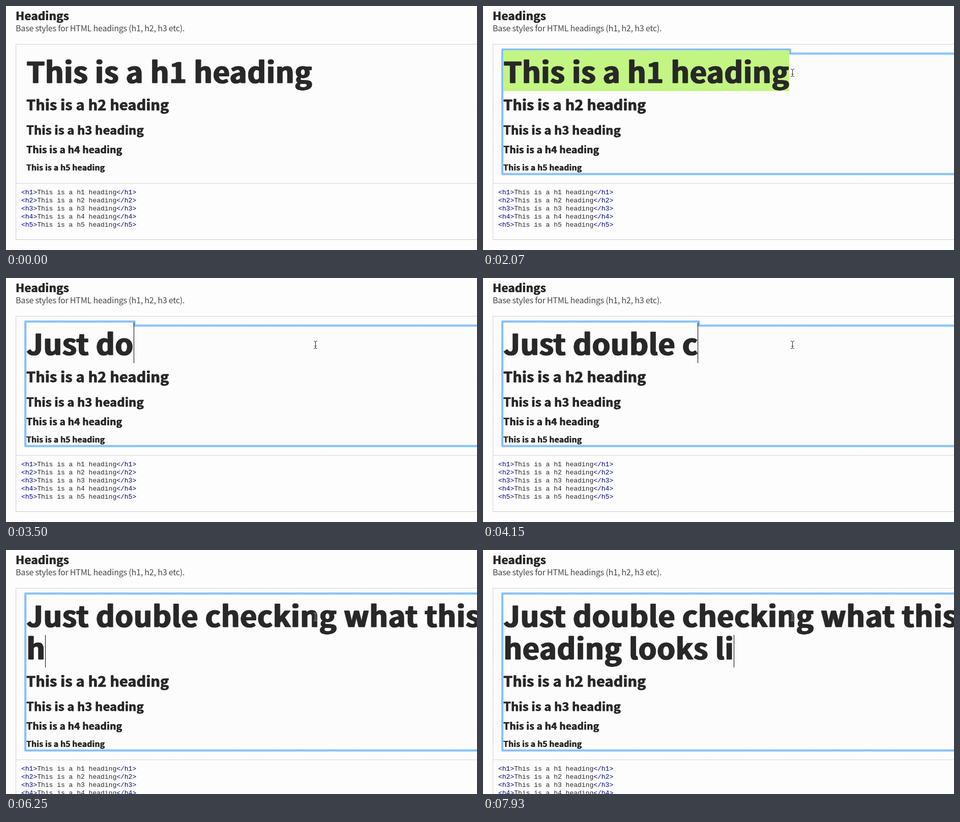
Write an HTML page with a canvas that moves like this. It is 926 px wide and 482 px high and loops after 7990 ms.

```html
<!DOCTYPE html>
<html lang="en">
<head>
<meta charset="utf-8">
<title>Editable headings</title>
<style>
html, body { margin: 0; width: 100%; height: 100%; overflow: hidden; background: #fdfdfd; }
canvas { display: block; }
</style>
</head>
<body>
<canvas id="stage" width="926" height="482"></canvas>
<script>
const ctx = document.getElementById('stage').getContext('2d');
const LOOP = 7990, INK = '#282828', NAVY = '#000080', H1 = 57.3;
const SANS = '"Noto Sans CJK JP", "Noto Sans CJK SC", "Noto Sans CJK", "Open Sans", sans-serif';
const MONO = '13px "Liberation Mono", "Courier New", monospace';

// bursts of typing: text, first and last key time
const BURSTS = [
  ['J', 2880, 2880], ['ust ', 3030, 3200], ['d', 3350, 3350], ['oub', 3500, 3700],
  ['le ', 3880, 4000], ['check', 4150, 4530], ['ing ', 4710, 4980], ['what this', 5160, 5740],
  ['\nheading l', 6250, 6950], ['ooks ', 7100, 7450], ['li', 7810, 7930]
];
const SUBHEADS = [['h2', 28.6, 206], ['h3', 23.54, 254], ['h4', 19.2, 291], ['h5', 15.73, 325]];

const dots = document.createElement('canvas');
dots.width = dots.height = 4;
const dot = dots.getContext('2d');
dot.fillStyle = '#f0f0f0';
dot.fillRect(0, 0, 1, 1);
const pattern = ctx.createPattern(dots, 'repeat');

function rect(x, y, w, h, color) {
  ctx.fillStyle = color;
  ctx.fillRect(x, y, w, h);
}

function strokes(...layers) {
  for (const [w, color] of layers) {
    ctx.lineWidth = w;
    ctx.strokeStyle = color;
    ctx.stroke();
  }
}

function text(str, x, y, font, color = INK, spacing = 0) {
  ctx.font = font;
  ctx.letterSpacing = spacing + 'px';
  ctx.fillStyle = color;
  ctx.fillText(str, x, y);
}

function heavyFont(size) {
  ctx.font = `900 ${size}px ${SANS}`;
  ctx.letterSpacing = size * .0115 + 'px';
}

// bold thickened to a black weight, mostly sideways
function heavy(str, x, y, size) {
  heavyFont(size);
  ctx.fillStyle = ctx.strokeStyle = INK;
  ctx.lineWidth = size * .011;
  ctx.lineJoin = 'round';
  for (const side of [-1, 1]) {
    const sx = x + size * (.006 + side * .016);
    ctx.fillText(str, sx, y);
    ctx.strokeText(str, sx, y);
  }
}

function width(str) {
  heavyFont(H1);
  return ctx.measureText(str).width;
}

function typed(t) {
  let out = '';
  for (const [str, start, end] of BURSTS) {
    if (t < start) break;
    const wrap = str[0] === '\n' ? 1 : 0, keys = str.length - wrap;
    const gap = keys > 1 ? (end - start) / (keys - 1) : 1;
    out += str.slice(0, wrap + Math.min(keys, Math.floor((t - start) / gap + 1e-6) + 1));
  }
  return out;
}

function ring(right, bottom) {
  ctx.beginPath();
  ctx.moveTo(38, 86);
  ctx.lineTo(right, 86);
  ctx.lineTo(right, 94);
  ctx.lineTo(960, 94);
  ctx.lineTo(960, bottom);
  ctx.lineTo(38, bottom);
  ctx.closePath();
  ctx.lineJoin = 'round';
  strokes([5.4, 'rgba(130,190,250,.35)'], [3.2, '#80bbf8']);
}

function pointer(t) {
  if (t < 830) return;
  let x = 886, y = 281;
  if (t >= 950) {
    const step = t < 1120 ? 0 : Math.min(4, Math.floor((t - 1120) / 40) + 1);
    x = Math.round(673 - 65 * step / 4);
    y = Math.round(158 - 26 * step / 4);
  }
  ctx.beginPath();
  for (const side of [-1, 1]) {
    ctx.moveTo(x + .5 + side * 3.5, y - 7.5);
    ctx.quadraticCurveTo(x + .5, y - 7.5, x + .5, y - 5);
    ctx.lineTo(x + .5, y + 5);
    ctx.quadraticCurveTo(x + .5, y + 7.5, x + .5 + side * 3.5, y + 7.5);
  }
  ctx.moveTo(x - 1.5, y + 2.5);
  ctx.lineTo(x + 2.5, y + 2.5);
  strokes([2.4, 'rgba(255,255,255,.5)'], [1, '#222']);
}

function draw(t) {
  const typing = t >= 2880;
  const lines = (typing ? typed(t) : 'This is a h1 heading').split('\n');
  const shift = lines.length > 1 ? 64 : 0;
  const base = 350 + shift, end = 40 + width(lines[0]);

  rect(0, 0, 926, 482, '#fdfdfd');
  heavy('Headings', 19, 28, 22.4);
  text('Base styles for HTML headings (h1, h2, h3 etc).', 19, 50, `300 16.1px ${SANS}`, '#484848', -.234);

  rect(20, 76, 906, base - 76, pattern);
  rect(19, 75, 907, 1, '#d5d5d5');
  rect(19, base, 907, 1, '#d5d5d5');
  rect(19, 461 + shift, 907, 1, '#c8c8c8');
  rect(19, 75, 1, 387 + shift, '#d0d0d0');

  if (t >= 1390) ring(Math.min(960, end + 2), 332 + shift);
  if (t >= 2070 && !typing) rect(40, 88, Math.round(end) - 40, 80, '#c3f583');

  lines.forEach((line, i) => heavy(line, 40, 152 + 64 * i, H1));
  for (const [tag, size, y] of SUBHEADS) heavy(`This is a ${tag} heading`, 40, y + shift, size);

  for (let i = 1; i <= 5; i++) {
    const y = 356 + 16 * i + shift;
    text(`<h${i}>`, 30, y, MONO, NAVY);
    text(`This is a h${i} heading`, 61.2, y, MONO);
    text(`</h${i}>`, 217.2, y, MONO, NAVY);
  }

  if (typing || (t >= 1390 && t < 1830)) {
    const x = Math.round(40 + width(lines[lines.length - 1]));
    if (shift) rect(x, 168, 1, 64, '#000');
    else rect(x, 88, 1, 80, '#000');
  }
  pointer(t);
}

function frame(now) {
  draw(now % LOOP);
  requestAnimationFrame(frame);
}
requestAnimationFrame(frame);
</script>
</body>
</html>
```
